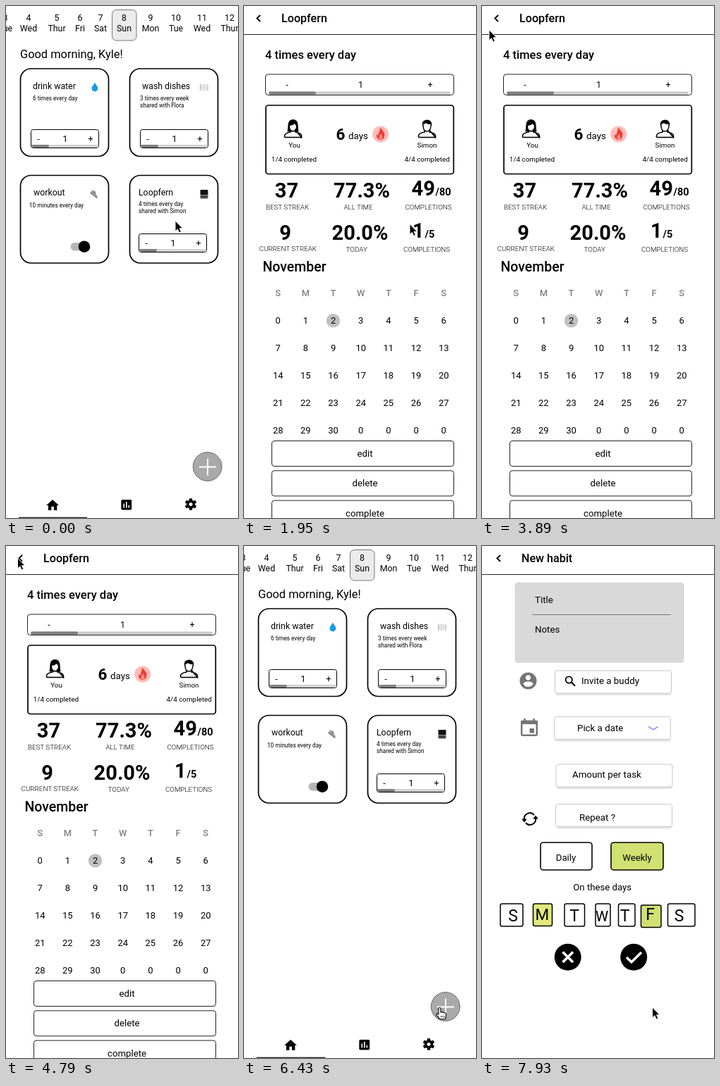
An HTML page for the animation above (8000 ms loop, 329 by 727 pixels).

```html
<!DOCTYPE html>
<html lang="en">
<head>
<meta charset="utf-8">
<title>Habit tracker</title>
<style>
  html, body { margin: 0; width: 100%; height: 100%; overflow: hidden; background: #fff; }
  svg { display: block; font-family: Roboto, sans-serif; }
</style>
</head>
<body>
<svg id="stage" width="329" height="727" viewBox="0 0 329 727"></svg>
<script>
const LOOP = 8000;

// Drawing helpers: each returns SVG markup.
const text = (x, y, size, str, { w = 400, a = 'start', fill = '#000' } = {}) =>
  `<text x="${x}" y="${y}" font-size="${size}" font-weight="${w}" text-anchor="${a}" fill="${fill}">${str}</text>`;
const mid = (x, y, size, str, opts) => text(x, y, size, str, { a: 'middle', ...opts });
const rect = (x, y, w, h, r, fill = 'none', stroke = 'none', sw = 1) =>
  `<rect x="${x}" y="${y}" width="${w}" height="${h}" rx="${r}" fill="${fill}" stroke="${stroke}" stroke-width="${sw}"/>`;
const circle = (x, y, r, fill = 'none', stroke = 'none', sw = 1) =>
  `<circle cx="${x}" cy="${y}" r="${r}" fill="${fill}" stroke="${stroke}" stroke-width="${sw}"/>`;
const line = (d, stroke = '#000', sw = 1) =>
  `<path d="${d}" fill="none" stroke="${stroke}" stroke-width="${sw}"/>`;
const shape = (d, fill = '#000') => `<path d="${d}" fill="${fill}" fill-rule="evenodd"/>`;
const at = (x, y, body, extra = '') => `<g transform="translate(${x} ${y}) ${extra}">${body}</g>`;

const header = (x, title) =>
  line(`M${x + 5} 13l-4.6 4.5 4.6 4.5`, '#000', 1.9) +
  text(x + 35, 23, 16.1, title, { w: 500 }) + line('M0 40.5H329', '#222', 1.1);

// ---------- Home ----------
const stepper = (x, y) =>
  rect(x + .5, y + .5, 96, 26, 3, '#fff', '#000') +
  rect(x + 1, y + 22, 95, 4, 2, '#d2d2d2') + rect(x + 1, y + 22, 25, 4, 2, '#808080') +
  mid(x + 11, y + 18, 13, '-') + mid(x + 49, y + 18, 13, '1') + mid(x + 85, y + 18, 13, '+');

const card = (x, y, title, titleX, titleY, notes, noteX, noteY) =>
  rect(x, y, 125, 124.5, 15, '#fff', '#000', 1.7) + text(titleX, titleY, 12.3, title) +
  notes.map((n, i) => text(noteX, noteY + i * 9.8, 8.2, n)).join('');

const days = [[-1, 3, 'Tue'], [32, 4, 'Wed'], [72, 5, 'Thur'], [105, 6, 'Fri'], [134, 7, 'Sat'],
  [167.5, 8, 'Sun'], [205, 9, 'Mon'], [241, 10, 'Tue'], [278, 11, 'Wed'], [317, 12, 'Thur']];

const drop = shape('M126 108.5C124 113 121.5 114 121.5 117a4.4 4.4 0 0 0 8.8 0C130.300 114 127.500 112.500 126 108.500Z', '#1499e6') +
  shape('M124 115q-1 2 .3 3.500q.2-2-.3-3.500Z', '#a9dcfa');
const plate = circle(280.5, 115.5, 4, '#eee', '#c4c4c4', .9) + circle(280.5, 115.5, 2, '#ddd') +
  line('M275.500 110.500V120.500M286 110.500V120.500', '#b4b4b4', 1.1);
const shoe = at(126, 266.5, shape('M-6-3Q-4-1-2-3.500Q1 0 5 .5Q7 1 6 3H-6Z', '#9b9b9b') +
  line('M-6 3H6M-2-2l2.500 2', '#666', 1), 'rotate(38)');
const laptop = rect(275.5, 261, 11, 7.5, .8, '#111') + shape('M275 269H287L286 273.500H276Z', '#555') +
  line('M277 271H285', '#222', 1);
const gear = at(262, 707.5, circle(0, 0, 4.4, 'none', '#000', 3.6) +
  [0, 60, 120].map(a => `<path d="M0-8.300V-5.500M0 5.500V8.300" stroke="#000" stroke-width="4.200" transform="rotate(${a})"/>`).join(''));

const home =
  rect(150.5, 5.5, 34.5, 43.5, 6, '#ebebeb', '#777') +
  days.map(([x, n, d]) => mid(x, 21, 12.4, n) + mid(x, 36, 12.4, d)).join('') +
  text(20, 74, 16.4, 'Good morning, Kyle!') +
  card(20.5, 89, 'drink water', 38, 118, ['6 times every day'], 38, 134) + stepper(35, 175) + drop +
  card(175.5, 89, 'wash dishes', 193, 118, ['3 times every week', 'shared with Flora'], 190, 134) + stepper(190, 175) + plate +
  card(20.5, 240.5, 'workout', 39, 269, ['10 minutes every day'], 33, 285.5) + shoe +
  rect(91.5, 336, 25, 11.5, 5.7, '#b5b5b5') + circle(111, 341.7, 8.3, '#000') +
  card(175.5, 240.5, 'Loopfern', 188, 269, ['4 times every day', 'shared with Simon'], 188, 284) + stepper(188, 323) + laptop +
  circle(285.7, 654, 20.4, '#a9a9a9', '#666') + line('M274 654.500H298M286 642.500V666.500', '#fff', 1.9) +
  shape('M64.300 716v-5.300h3.600v5.300h4.400v-7h2.700L66.100 701l-8.900 8h2.700v7Z') +
  shape('M165 701h11.500a1.700 1.700 0 0 1 1.700 1.700v11a1.700 1.700 0 0 1-1.700 1.700h-11.500a1.700 1.700 0 0 1-1.700-1.700v-11a1.700 1.700 0 0 1 1.700-1.700Z') +
  line('M167.300 706.500V712.500M170.800 704V712.500M174.300 709V712.500', '#fff', 1.6) +
  gear + line('M18 726.500H115', '#222', 1.3);

// ---------- Habit details ----------
const shoulders = line('M-12 12.500V10Q-11.500 6.500-3.500 5V2.500M3.500 2.500V5Q11.500 6.500 12 10V12.500Z', '#000', 1.6);
const avatarYou = at(69.5, 174, shape('M-8 4.500Q-7-3-7-6Q-6-13 0-13Q6-13 7-6Q7-3 8 4.500Z') +
  shape('M-4.500-4Q1-5 2-7L4.500-4Q4.500 3 0 3Q-4.500 3-4.500-4Z', '#fff') +
  shape('M-12 12.500V10Q-11 6.500-3 5L0 7L3 5Q11 6.500 12 10V12.500Z', '#fff') + shoulders + line('M-12 12.500H12', '#000', 1.6));
const avatarPal = at(259.5, 174, line('M-5.500-5Q-5.500 4 0 4Q5.500 4 5.500-5', '#000', 1.4) +
  shape('M-6.500-3Q-8-12 0-12.500Q8-12 6.500-3L5-6Q1-5.500-2-8Q-3-6-5-6Z') + shoulders + line('M-12 12.500H12', '#000', 1.6));
const flame = circle(193.7, 182, 11.5, '#ffbcb8') +
  shape('M193 173Q198 177 198 180L199 178.500Q201 189.500 193.700 190Q187 189.500 188 182L190 184Q192 179 193 173Z', '#ef3b36') +
  shape('M194 181.500Q198 186 195.500 189Q193 190 191.500 188Q191 185 194 181.500Z', '#ff8f86');

const bold = { w: 700 };
const label = (x, y, str) => mid(x, y, 9.8, str, { w: 300 });
const column = i => 48.2 + i * 39.17;
const calendar = [...'SMTWTFS'].map((d, i) => mid(column(i), 412, 13, d, { w: 500, fill: '#808080' })).join('') +
  circle(126.5, 446.7, 9.8, '#c1c1c1') +
  Array.from({ length: 35 }, (_, n) =>
    mid(column(n % 7), 451 + Math.floor(n / 7) * 39.1, 13, n > 30 ? 0 : n)).join('');

const details =
  header(18, 'Loopfern') + text(30, 74.5, 16.5, '4 times every day', { w: 500 }) +
  rect(30.5, 97, 267, 29.5, 4, '#fff', '#222') +
  rect(35, 121.5, 258, 4.2, 2, '#cacaca') + rect(35, 121.5, 67, 4.2, 2, '#7d7d7d') +
  mid(61, 116, 12.5, '-') + mid(165.5, 116, 12.5, '1') + mid(264, 116, 12.5, '+') +
  rect(31, 141, 266.3, 97.5, 3.5, '#fff', '#000', 1.7) +
  avatarYou + mid(71.5, 201, 9.8, 'You') + mid(71, 220.5, 9.9, '1/4 completed') +
  avatarPal + mid(259.5, 201, 9.8, 'Simon') + mid(259.7, 220.5, 9.9, '4/4 completed') +
  text(130.5, 190, 22.5, '6', bold) + text(148, 189, 13.4, 'days') + flame +
  mid(60.5, 272, 29, '37', bold) + mid(167, 272, 29, '77.3%', bold) +
  text(237.5, 268.500, 29, '49', bold) + text(271.5, 268.500, 14.5, '/80', bold) +
  label(61.5, 289, 'BEST STREAK') + label(162, 289, 'ALL TIME') + label(261.5, 289, 'COMPLETIONS') +
  mid(58.5, 332, 29, '9', bold) + mid(164.5, 332, 29, '20.0%', bold) +
  text(239, 329, 29, '1', bold) + text(256.5, 329, 14.5, '/5', bold) +
  label(62.3, 347.5, 'CURRENT STREAK') + label(159.7, 349, 'TODAY') + label(259, 349, 'COMPLETIONS') +
  text(26.5, 377, 19.5, 'November', { w: 500 }) + calendar +
  ['edit', 'delete', 'complete'].map((name, i) =>
    rect(39.5, 617.5 + i * 42.3, 258, 36, 3.5, '#fff', '#222') + mid(171.5, 640 + i * 42.3, 13.2, name)).join('');

// ---------- New habit ----------
const field = (x, y, textX, baseline, str) =>
  rect(x + 1, y + 3, 164, 32, 3, '#e3e3e3') + rect(x, y, 165, 32, 3, '#fff', '#c8c8c8') +
  text(textX, baseline, 13.3, str);
const tile = (x, y, w, h, letter, letterX, baseline, size, fill = '#fff') =>
  rect(x, y, w, h, 2.5, fill, '#000', 1.5) + mid(letterX, baseline, size, letter);
const accountIcon = circle(65.5, 191.5, 12, '#757575') + circle(65.5, 186.8, 3.6, '#fff') +
  shape('M58.500 196Q59 192.700 65.500 192.500Q72 192.700 72.500 196Q70 200 65.500 200Q61 200 58.500 196Z', '#fff');
const calendarIcon = rect(56.2, 248.7, 21.6, 20, 1.5, 'none', '#757575', 2.5) +
  line('M55 250.500H79', '#757575', 5) + line('M60.500 245V249M73.500 245V249', '#757575', 2.6) + rect(67.5, 259, 6.500, 6.500, 0, '#757575');
const arrowArc = line('M-8 1A8 8 0 0 1 6-5.500', '#000', 2) + shape('M-11.800 0H-4.200L-8 5Z');
const repeatIcon = at(68, 387.5, arrowArc + `<g transform="rotate(180)">${arrowArc}</g>`);

const newHabit =
  header(21, 'New habit') + rect(47, 52, 239, 113.5, 4, '#d9d9d9', '#cfcfcf', .6) +
  text(75, 81, 13.3, 'Title') + line('M71.500 97.500H267.500', '#777') + text(75, 122.5, 13.3, 'Notes') +
  accountIcon + field(103.5, 177, 141, 196, 'Invite a buddy') +
  circle(123.3, 190, 4.6, 'none', '#000', 1.8) + line('M126.600 193.300L132 198.700', '#000', 2.2) +
  calendarIcon + field(102.5, 242.5, 135, 263, 'Pick a date') + line('M236 256.500L242.800 260.800L249.600 256.500', '#6f72ee', 1.1) +
  field(105, 310, 128, 329, 'Amount per task') +
  repeatIcon + field(104.5, 366.5, 138, 390, 'Repeat ?') +
  rect(83, 421, 73, 39, 4, '#fff', '#000', 1.6) + mid(119, 447, 13.2, 'Daily') +
  rect(183, 421, 74, 39, 4, '#d0e172', '#000', 1.6) + mid(220, 447, 13.2, 'Weekly') +
  mid(170.7, 489, 13.2, 'On these days') +
  tile(26, 508, 32, 32, 'S', 44, 532.5, 23) + tile(72.5, 508, 27, 31.5, 'M', 85.300, 531, 22.5, '#e1e87d') +
  tile(117, 508, 28.5, 32, 'T', 131, 532.5, 23) + tile(161, 508, 21, 32, 'W', 170, 533, 20.5) +
  tile(193.5, 508, 23.500, 32, 'T', 202.5, 532.5, 23) + tile(225.5, 510, 28.500, 31.500, 'F', 238.5, 531, 23, '#d0e172') +
  tile(263.5, 508, 38.500, 32, 'S', 279.5, 532.5, 23) +
  circle(121.7, 583.8, 19, '#000') + line('M114.500 576.500L129 591M129 576.500L114.500 591', '#fff', 3.600) +
  circle(215.2, 583.8, 19, '#000') + line('M205 584L212 590.800L226 577', '#fff', 3.600);

// ---------- Pointer ----------
const arrow = '<path d="M0 0V15L3.400 11.800L5.700 17L8.300 15.900L6.100 10.800H10.600Z" stroke="#fff" stroke-width="1"/>';
const hand = '<path d="M-1.600 9.500V1.500A1.500 1.500 0 0 1 1.500 1.500V6.500Q3.300 5.300 4.200 6.800Q6 6 6.800 7.500Q9 7.200 9 9.500V11.500Q9 14 7.500 16.300H-.3Q-1.500 13.500-4.500 10.500Q-5.300 8.500-3.500 8.300Q-2.500 8.500-1.600 9.500Z" fill="#fff" stroke="#000" stroke-width="1.100"/><path d="M2 11.500V14M4.200 11.500V14M6.400 11.500V14" stroke="#000" stroke-width=".8"/>';

// Sampled pointer path: [start ms, x, y, is hand]; each position holds until the next.
const pointer = [
  [0, 240, 305], [450, 239, 304], [600, 237.6, 304, 1], [1200, 235, 310, 1], [1950, 235, 309.5],
  [2550, 228, 316], [2700, 198, 293], [2850, 156, 245], [3000, 108, 192], [3150, 76, 158], [3300, 61, 145.500],
  [3600, 46, 110], [3740, 25, 66], [3890, 10, 34], [4040, 2, 23], [4190, 8, 21], [4340, 17, 18.5, 1],
  [4790, 16.5, 17], [5230, 21, 50], [5380, 34, 165], [5530, 53.5, 309.5], [5680, 95, 450],
  [5830, 160, 570], [5980, 228, 662], [6130, 272, 706], [6280, 275, 682], [6430, 277.5, 655.5, 1],
  [6880, 277, 665], [7780, 260, 661], [7930, 241.5, 655],
];
const screens = [[0, 'home'], [1950, 'details'], [4930, 'home'], [6880, 'newHabit']];
const current = (track, t) => track.findLast(step => step[0] <= t);

const stage = document.getElementById('stage');
stage.innerHTML = Object.entries({ home, details, newHabit, arrow, hand })
  .map(([id, body]) => `<g id="${id}">${body}</g>`).join('');
const layers = [...stage.children];

function draw() {
  const t = performance.now() % LOOP;
  const [, x, y, isHand] = current(pointer, t);
  const visible = [current(screens, t)[1], isHand ? 'hand' : 'arrow'];
  for (const layer of layers) {
    layer.style.display = visible.includes(layer.id) ? '' : 'none';
    if (layer.id === visible[1]) layer.setAttribute('transform', `translate(${x} ${y})`);
  }
  requestAnimationFrame(draw);
}
draw();
</script>
</body>
</html>
```
